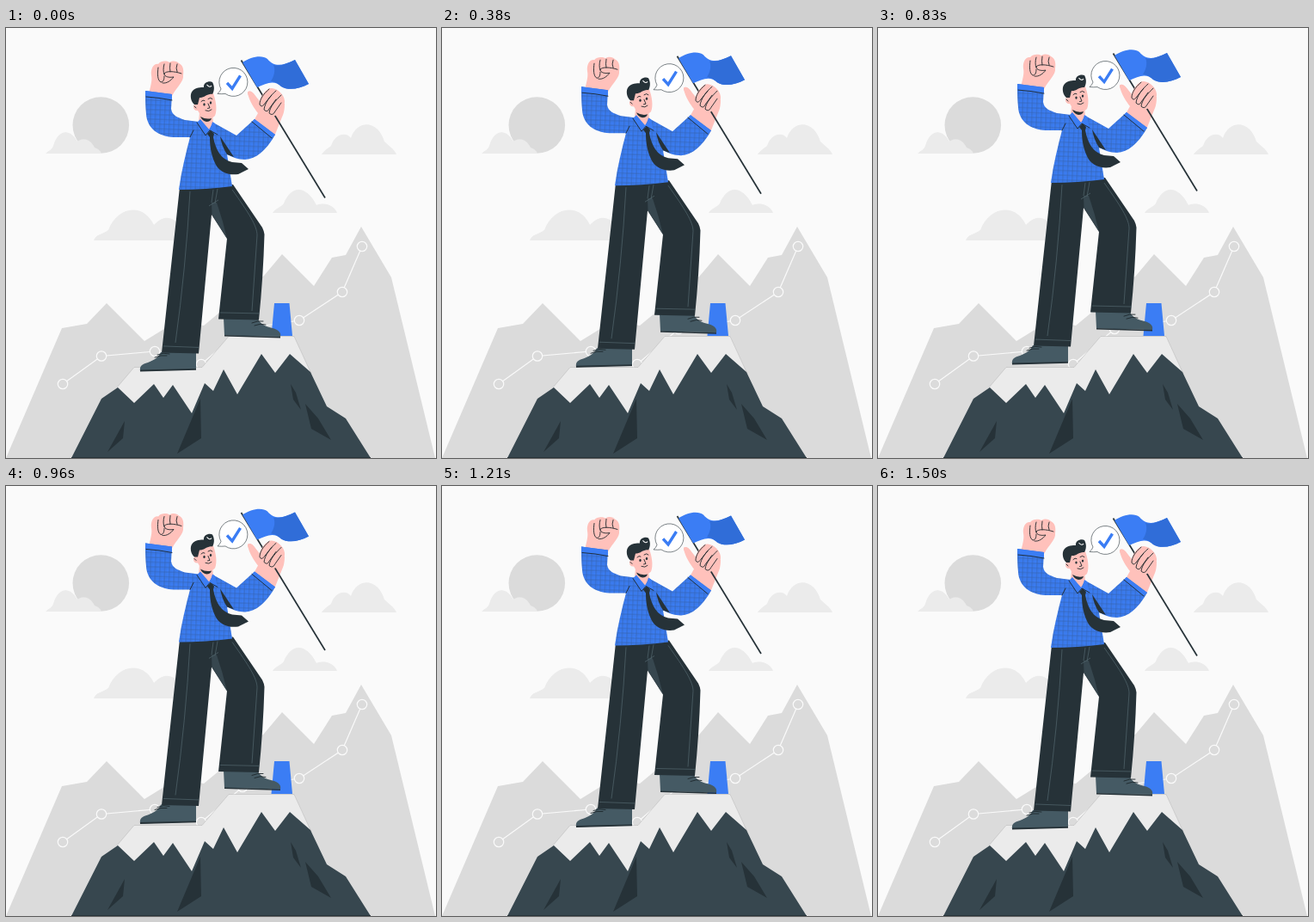
An HTML page that plays this animation: 500x500 px, repeating every 1.54 s.

```html
<!DOCTYPE html>
<html lang="en">
<head>
<meta charset="utf-8">
<title>Summit</title>
<style>
  html, body { margin: 0; width: 100%; height: 100%; overflow: hidden; background: #fafafa; }
  svg { display: block; width: 100%; height: 100%; }
  .grey { fill: #dbdbdb; }
  .cloud { fill: #ebebeb; }
  .blue { fill: #3b7df4; }
  .ink { fill: #263238; }
  .slate { fill: #37474f; }
  .shoe { fill: #455a64; }
  .skin { fill: #ffc1bb; }
  .line { fill: none; stroke: #1d272c; stroke-width: .9; stroke-linecap: round; stroke-linejoin: round; }
  .pole { fill: none; stroke: #263238; stroke-width: 1.7; }
  .seam { fill: none; stroke: #53686f; stroke-width: .7; }
</style>
</head>
<body>
<svg viewBox="0 0 500 500">
  <defs>
    <pattern id="plaid" width="5.500" height="5.500" patternUnits="userSpaceOnUse" patternTransform="rotate(2)">
      <path d="M1 0V5.500M0 1H5.500" stroke="#263238" stroke-width=".6" opacity=".42"/>
      <path d="M3 0V5.500M0 3H5.500" stroke="#263238" stroke-width=".4" opacity=".15"/>
    </pattern>
    <path id="shirt" d="M162 73L193 77L192 94C193 102 200 104 208 107L224 109L236 118L241 110L268 125L289 106L313 124C302 143 291 152 278 153C270 153 263 150 257 147L263 184Q232 188 201 188C204 166 209 146 214 127H195C176 126 164 116 163 100C162 90 162 82 162 73Z"/>
  </defs>

  <circle class="grey" cx="110.300" cy="113" r="32.800"/>
  <g class="cloud">
    <path d="M46 146C50 142 53 142 55 137C60 119 74 115 83 132C90 126 99 130 103 139C108 141 110 143 111 146Z"/>
    <path d="M367 147C371 141 376 139 378 137C383 122 396 121 401 128C408 107 432 106 440 132C446 138 451 140 454 147Z"/>
    <path d="M310 215C314 209 319 209 323 204C331 184 348 181 361 206C372 202 382 207 385 215Z"/>
    <path d="M102 247C105 239 113 240 119 235C129 208 159 202 172 229C184 216 196 220 201 230C208 237 213 240 215 247Z"/>
  </g>

  <path class="grey" d="M0 500L65 349L94 344L117 320L161 364L200 340L230 346L300 288L321 263L358 300L379 267L395 264L413 231L448 290L499 500Z"/>
  <g id="chart" fill="#dbdbdb" stroke="#fafafa" stroke-width="1.200"></g>

  <path d="M129 418L149 394.500H228L259 358.500H335L355 402L269 432L216 450L150 438Z" fill="#ebebeb" stroke="#aaa" stroke-width=".4"/>
  <path class="slate" d="M76 500L111 431L130 418L149 436L172 414L183 430L194 415L216 448L231 413L241 422L253 397L269 426L297 379L313 401L330 379L354 400L373 440L395 454L424 500Z"/>
  <path class="ink" d="M138 457L136 477L118 493ZM226 431L227 477L199 495ZM331 414L337 424L343 444L334 432ZM348 437L363 454L378 479L355 466ZM76 499H424V500H76Z"/>
  <path class="blue" d="M312 320H329.500L333 358H308.500Z"/>

  <g id="climber">
    <!-- legs -->
    <path class="shoe" d="M180 377H221V397L156 399C155 393 158 391 165 389C173 386 178 382 180 377ZM253 337H292C296 345 302 347 310 349C317 351 320 354 319 359L254 357.500Z"/>
    <path class="ink" d="M156 397.500L221 396V397.700L156 399.500ZM254 357L319 359V360.500L254 358.500Z"/>
    <path class="line" d="M173 383Q180 380 187 381M176 380Q183 377 190 379M286 343Q293 340 299 341M289 346Q296 343 302 345"/>
    <path class="ink" d="M202 185L181 377.500L224 378.500L239 217L257 245L247 338.500L294 339.500Q299 291 300.500 240Q300 236 298 232L264 182Z"/>
    <path class="slate" d="M239 203L239.500 217L257 245Q252 223 245 203Z"/>
    <path class="seam" d="M214 190Q209 280 197 366M263 188C282 215 292 230 292 241L286 329M183 370L224 371.500M249 331L295 332M246 187L243 204M241 188L239 203M236 207L247 200"/>

    <!-- raised fist -->
    <path class="skin" d="M166 76C169 65 170 60 169 55C168 47 172 41 177 42C180 38 187 38 190 40C195 37 199 39 201 41C206 43 207 49 206 55C207 62 199 68 193 79Z"/>
    <path class="line" d="M177 46C176 53 176 61 180 63C183 63 184 60 184 56M184 42Q182 49 184 54M191 41Q190 47 191 51M199 42Q197 47 199 51M204 53C195 50 186 50 184 53C184 57 190 58 195 57C192 61 187 65 182 64"/>

    <!-- flag hand -->
    <path class="skin" d="M281 76C281 72 286 73 290 79L295 85L324 88C324 98 322 101 320 106L312 126L288 108L293 99C289 94 283 85 281 76Z"/>
    <path class="pole" d="M273.500 37.500L371 197.500"/>
    <path class="skin" d="M295 90C293 82 303 69 309 70C318 71 325 80 324 87C321 95 318 99 313 102Q308 103 306 99Q301 100 300 95Q296 95 295 90Z"/>
    <path class="line" d="M306 71C299 77 295 83 295 89Q297 93 300 89L309 78M314 73C307 79 301 87 300 95Q304 99 306 94L314 83M320 78C314 84 307 91 306 99Q310 103 313 97L320 87"/>

    <!-- flag -->
    <path class="blue" d="M275 40C285 33 298 31 304 36C312 46 322 44 336 37L352 65C341 71 328 73 320 68C312 60 303 64 292 69Z"/>
    <path d="M311 43C318 45 325 42 336 37L352 65C341 71 328 73 320 68C316 64 311 62 308 62C311 57 314 50 311 43Z" fill="#306dd8"/>

    <!-- neck, shirt, tie -->
    <path class="skin" d="M225 98H240L241 112L236 119L224 109Z"/>
    <use href="#shirt" class="blue"/>
    <use href="#shirt" fill="url(#plaid)"/>
    <path class="blue" d="M226 106L222 110L232 125L237 119ZM240 109L237 119L246 124L243 111ZM162 73L193 77V84L162.500 80ZM289 106L313 124L309 128L286 109Z"/>
    <path class="line" d="M222 110L232 125L237 119L246 124M163 80Q178 81 193 84M286 109L309 128M214 127L218 119"/>
    <path class="ink" d="M234 123L238 119L242 123L241 127C244 142 250 153 263 156L274 157L282 164L270 170C259 172 247 167 243 157C238 146 237 136 237 127ZM249 126L265 150L257 147Q251 138 249 126Z"/>

    <!-- head -->
    <path class="skin" d="M223 80L241 76C244 84 246 95 243 102C239 107 230 105 226 101L223 96C217 97 216 88 222 88Z"/>
    <path class="ink" d="M226 103Q233 107 239 105Q238 109 233 109Q228 108 226 103ZM219 89C215 86 213 77 217 73C220 69 227 69 230 69C229 64 236 61 240 63C243 68 242 74 240 77C234 76 230 82 225 81L223 89Z"/>
    <path d="M233.500 66Q237 70 239 67" fill="none" stroke="#fafafa" stroke-width="1.100"/>
    <ellipse class="ink" cx="230.500" cy="89" rx="1.200" ry="1.600"/>
    <ellipse class="ink" cx="238" cy="87" rx="1.200" ry="1.600"/>
    <path class="line" d="M227 85.500Q229 83 231 84.500M235 82.500Q238 80 240 82.500M235 88L237 93L234.500 93.500M232 96Q236 98 239 95M219 91L221 93"/>

    <!-- speech bubble -->
    <path d="M250 71A16.500 16.500 0 1 1 255 76.500Q251 77 246 76.500Q249 74 250 71Z" fill="#fff" stroke="#263238" stroke-width=".6"/>
    <path d="M257 64L263 70.500L272.500 55.500" fill="none" stroke="#3b7df4" stroke-width="3.400"/>
    <path class="skin" d="M281 76C281 72 286 73 290 79L294 85L288 88Q283 82 281 76Z"/>
  </g>
</svg>
<script>
  const LOOP = 1540, RISE = 4.15, LEAD = 42;
  const points = [[66, 414], [111, 381.5], [173, 376], [227, 391], [275, 350], [341, 340], [391, 307], [414, 254]];
  document.getElementById('chart').innerHTML =
    `<polyline points="${points.join(' ')}" fill="none"/>` +
    points.map(([x, y]) => `<circle cx="${x}" cy="${y}" r="5.700"/>`).join('');

  const climber = document.getElementById('climber');
  const start = performance.now();
  function draw() {
    const phase = (performance.now() - start + LEAD) / LOOP * 2 * Math.PI;
    climber.setAttribute('transform', `translate(0 ${RISE * (Math.cos(phase) - 1)})`);
    requestAnimationFrame(draw);
  }
  draw();
</script>
</body>
</html>
```
